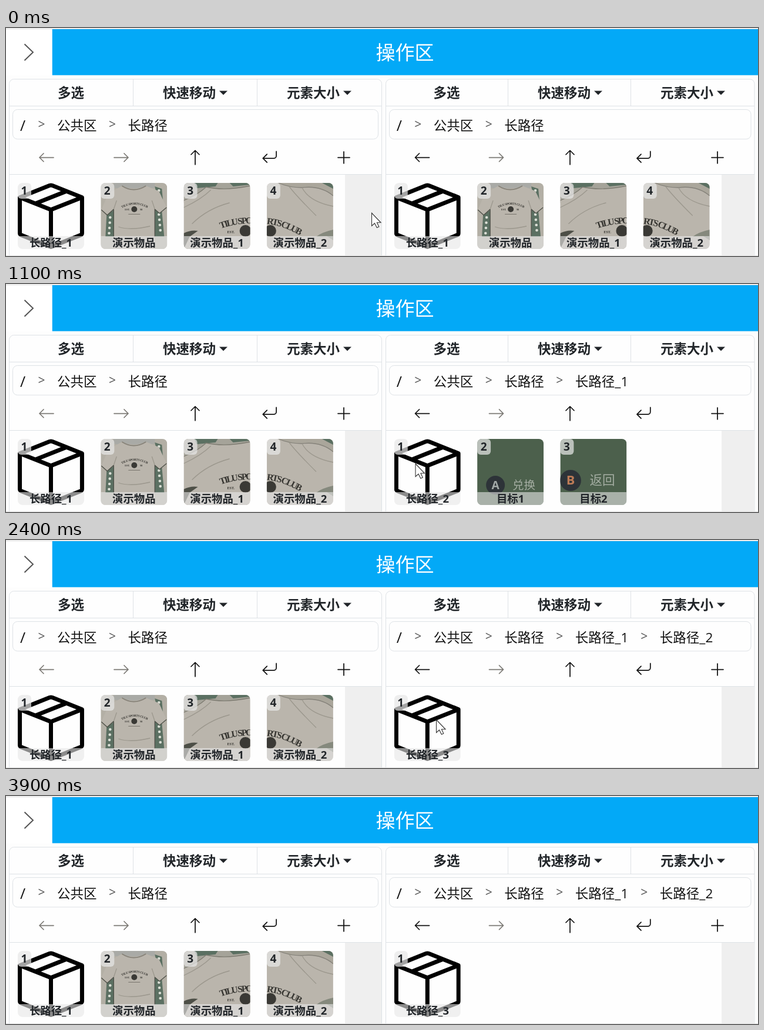
An HTML page for the animation above (4000 ms loop, 1280 px wide and 390 px high).

```html
<!DOCTYPE html>
<html lang="zh-CN">
<head>
<meta charset="utf-8">
<title>操作区</title>
<style>
html, body { margin: 0; width: 100%; height: 100%; overflow: hidden; background: #fdfdfd; }
svg { display: block; width: 1280px; height: 390px; }
text { font-family: 'Open Sans', 'Noto Sans CJK SC', 'Noto Sans CJK', sans-serif; fill: #212529; }
.title { font-size: 33px; fill: #fff; text-anchor: middle; }
.btn { font-size: 22.5px; font-weight: 700; }
.crumb { font-size: 22.5px; fill: #111; }
.root { font-size: 25px; fill: #111; }
.sep { font-size: 21px; fill: #555; }
.num { font-size: 19px; font-weight: 700; text-anchor: middle; }
.cap { font-size: 18.4px; font-weight: 700; text-anchor: middle; }
.line { fill: none; stroke: #dee2e6; }
.icon { fill: none; stroke-width: 1.75; stroke-linecap: round; stroke-linejoin: round; }
.print { font-family: 'Liberation Serif', serif; font-weight: 700; fill: #34332f; }
</style>
</head>
<body>
<svg id="stage" viewBox="0 0 1280 390" xmlns="http://www.w3.org/2000/svg"></svg>
<script>
const stage = document.getElementById('stage');
const LOOP = 4000, STEP = 100;
const INK = '#111', MUTED = '#7b7974';
const CLOTH = '#bab5ac', SHADE = '#9b978d', DARK = '#4d4f47', BOARD = '#5b7062';

const text = (cls, x, y, s, extra = '') => `<text class="${cls}" x="${x}" y="${y}" ${extra}>${s}</text>`;
const rect = (x, y, w, h, fill, rx = 0) => `<rect x="${x}" y="${y}" width="${w}" height="${h}" fill="${fill}" rx="${rx}"/>`;
const path = (d, fill) => `<path d="${d}" fill="${fill}"/>`;
const line = d => `<path class="line" d="${d}"/>`;
const dot = (x, y, r, fill) => `<circle cx="${x}" cy="${y}" r="${r}" fill="${fill}"/>`;
const fold = (d, color = SHADE, w = 1.3) => `<path d="${d}" fill="none" stroke="${color}" stroke-width="${w}"/>`;
const icon = (x, y, d, color) => `<path class="icon" transform="translate(${x} ${y})" d="${d}" stroke="${color}"/>`;
const print = (id, size, gap, s) =>
  `<text class="print" font-size="${size}" letter-spacing="${gap}"><textPath href="#${id}">${s}</textPath></text>`;

const defs = `<defs>
  <clipPath id="tile"><rect width="113" height="113" rx="8"/></clipPath>
  <path id="arch" d="M36 43Q57 31 80 43"/>
  <path id="rise" d="M63 78Q87 69 122 69"/>
  <path id="fall" d="M0 70Q32 73 66 96"/>
</defs>`;

const ICONS = {
  left: 'M12 0H-12M-5-7L-12 0L-5 7',
  right: 'M-12 0H12M5-7L12 0L5 7',
  up: 'M0 12V-12M-7-5L0-12L7-5',
  enter: 'M11.4-10.5V-3A4.4 4.4 0 0 1 7 1.4H-11.4M-4.4-5.6L-11.4 1.4L-4.4 8.4',
  plus: 'M-10 0H10M0-10V10'
};

const BOX = 'M8.186 1.113a.5.5 0 0 0-.372 0L1.846 3.5l2.404.961L10.404 2zm3.564 1.426L5.596 5 8 5.961 14.154 3.5z' +
  'm3.25 1.7-6.5 2.6v7.922l6.5-2.6V4.24zM7.5 14.762V6.838L1 4.239v7.923zM7.443.184a1.5 1.5 0 0 1 1.114 0l7.129 2.852' +
  'A.5.5 0 0 1 16 3.5v8.662a1 1 0 0 1-.629.928l-7.185 2.874a.5.5 0 0 1-.372 0L.63 13.09a1 1 0 0 1-.63-.928V3.5' +
  'a.5.5 0 0 1 .314-.464z';

const box = `<path class="box" d="${BOX}" transform="scale(7.06)"/>`;

function dots(x, y, n, dx) {
  let s = '';
  for (let i = 0; i < n; i++) s += dot(x + dx * i, y + 9 * i, 2.3, '#d9ddd4');
  return s;
}

const shirt = rect(0, 0, 113, 113, '#b3afa5') +
  path('M22 0H92V8Q56 16 22 8Z', '#a9aaa6') +
  path('M92 6L104 10L106 32L96 26Z', BOARD) + dots(99, 13, 2, 1) +
  path('M10 54L23 46V92H8Z', BOARD) + dots(16, 59, 4, -.6) +
  path('M92 42L104 48L108 92H92Z', BOARD) + dots(99, 54, 4, .8) +
  path('M36 5Q56 14 77 5L99 14L112 42L100 52L92 45V113H22V45L11 55L1 46L13 18Z', CLOTH) +
  fold('M1 46L11 55L22 45V92M112 42L100 52L92 45V92', DARK) +
  fold('M36 5Q56 18 77 5', '#88847a', 2) +
  fold('M22 45L27 30M92 45L87 30M30 75Q50 82 84 74') +
  print('arch', 5.2, -.3, 'TILU SPORTS CLUB') +
  dot(57, 45, 5, '#3a3935') +
  text('print', 41, 47, 'EST.', 'font-size="4"') + text('print', 67, 47, '98', 'font-size="4"') +
  rect(47, 53, 20, 1, '#77736b');

const left = rect(0, 0, 113, 113, CLOTH) +
  path('M0 0H113V5Q70 13 38 8Q20 22 0 34Z', '#a5a399') +
  path('M18 0H58L54 6L22 9Z', BOARD) + path('M78 0H113V3L84 6Z', BOARD) +
  path('M0 30Q24 20 38 7Q70 14 113 5V113H0Z', CLOTH) +
  fold('M0 30Q24 20 38 7Q70 14 113 5', '#7d7b71') +
  fold('M0 42Q30 28 46 12M14 70Q40 44 78 34') +
  path('M0 86Q12 80 24 82L10 92L0 113Z', DARK) +
  print('rise', 15.5, -2.3, 'TILU SPO') +
  text('print', 74, 86, 'EST.', 'font-size="6"') +
  dot(105, 82, 10, '#3a3935');

const right = rect(0, 0, 113, 113, CLOTH) +
  path('M20 0H113V22Q92 4 60 8Q38 8 20 0Z', '#aaa69b') +
  path('M94 0H113V10Z', BOARD) +
  fold('M20 0Q38 8 60 8Q92 4 113 22', '#85827a') +
  fold('M60 8Q72 32 113 40M38 6Q50 22 84 56') +
  path('M113 80Q94 84 84 92L102 91L113 98Z', '#85897d') +
  print('fall', 15.5, -2.3, 'RTS CLUB') +
  dot(6, 82, 10, '#3a3935');

const pad = (cx, cy, r, key, keyFill, x, y, size, word) => rect(0, 0, 113, 113, '#4c604c') +
  dot(cx, cy, r, '#2d3338') +
  text('', cx, cy + 7, key, `font-size="${r * 1.2}" font-weight="700" text-anchor="middle" style="fill:${keyFill}"`) +
  text('', x, y, word, `font-size="${size}" font-weight="500" style="fill:#a4ada2"`);

const swap = pad(31, 79, 16, 'A', '#a3aaa8', 60, 86, 19.5, '兑换');
const back = pad(17.5, 71, 18, 'B', '#bd7b57', 50, 78, 21.5, '返回');

const tiles = (x0, items) => items.map(([art, cap], i) =>
  `<g transform="translate(${x0 + 141.3 * i} 265)" clip-path="url(#tile)">${art}` +
  rect(0, 0, 23, 27, 'rgba(232,232,232,.7)', 6) + rect(0, 91, 113, 22, 'rgba(232,232,232,.6)') +
  text('num', 11, 20, i + 1) + text('cap', 56.5, 108.5, cap) + '</g>').join('');

const crumbs = (x0, names) => {
  let x = x0 + 63, s = text('root', x0, 175.5, '/');
  for (const n of names) {
    s += text('sep', x - 32.5, 171.5, '&gt;') + text('crumb', x, 174.5, n);
    x += n.length > 3 ? 144 : 120.5;
  }
  return s;
};

const caret = x => path(`M${x} 107.5H${x + 14}L${x + 7} 114.5Z`, '#212529');

function panel(x, w, cuts, labels, icons, backColor) {
  const r = x + w;
  return `<rect x="${x}" y="87.5" width="${w}" height="320" rx="8" fill="#fefefe" stroke="#dee2e6"/>` +
    line(`M${x} 133.5H${r}M${cuts[0]} 88V133M${cuts[1]} 88V133M${x} 250.5H${r}`) +
    `<rect class="line" x="${x + 6}" y="139.5" width="${w - 12}" height="50.5" rx="8"/>` +
    ['多选', '快速移动', '元素大小'].map((s, i) =>
      text('btn', labels[i], 119, s) + (i ? caret(labels[i] + 96) : '')).join('') +
    Object.keys(ICONS).map((k, i) =>
      icon(icons[i], 221.5, ICONS[k], i === 0 ? backColor : i === 1 ? MUTED : INK)).join('');
}

const home = [[box, '长路径_1'], [shirt, '演示物品'], [left, '演示物品_1'], [right, '演示物品_2']];
const levels = [
  { trail: ['公共区', '长路径'], items: home },
  { trail: ['公共区', '长路径', '长路径_1'], items: [[box, '长路径_2'], [swap, '目标1'], [back, '目标2']] },
  { trail: ['公共区', '长路径', '长路径_1', '长路径_2'], items: [[box, '长路径_3']] }
];

stage.innerHTML = defs +
  rect(0, 0, 1280, 390, '#fdfdfd') + rect(0, 1, 1280, 1, '#dcdcdc') +
  rect(78.5, 2, 1201.5, 78.7, '#03a9f7') + rect(0, 2, 78.5, 79, '#fff') +
  '<path d="M31.5 27.5L46 41.5L31.5 55.5" fill="none" stroke="#555" stroke-width="2"/>' +
  text('title', 679, 54, '操作区') +
  panel(5.5, 634, [216.5, 427.5], [88, 267, 478], [69, 196, 322, 448.7, 575], MUTED) +
  panel(646.5, 627.5, [854.5, 1063.5], [727.5, 905, 1114], [708.5, 834.5, 960, 1085.4, 1211], INK) +
  rect(577, 251, 62, 138, '#efefef') + rect(1218, 251, 55.5, 138, '#efefef') +
  crumbs(24, levels[0].trail) + tiles(20, home) +
  levels.map(l => `<g class="level">${crumbs(664.8, l.trail)}${tiles(660.8, l.items)}</g>`).join('') +
  rect(0, 389, 1280, 1, '#e0e0e0') +
  '<path id="cursor" d="M.5.5V22.5L5.5 18L9.3 25.6L12.8 24L9.4 16.8H16Z" fill="#fff" stroke="#333" stroke-width="1.1"/>';

const groups = [...stage.querySelectorAll('.level')];
const pressed = groups[1].querySelector('.box');
const cursor = document.getElementById('cursor');

// time, x, y
const ROUTE = [
  [0, 622, 316], [500, 692, 307], [600, 692, 307], [800, 696.5, 307], [2300, 696.5, 307],
  [2800, 874, 307], [3300, 993, 307], [3700, 1150, 400], [LOOP, 1150, 400]
];

function place(t) {
  const i = ROUTE.findIndex(k => k[0] > t);
  const [t0, x0, y0] = ROUTE[i - 1], [t1, x1, y1] = ROUTE[i];
  const p = (t - t0) / (t1 - t0);
  return [x0 + (x1 - x0) * p, y0 + (y1 - y0) * p];
}

function draw(ms) {
  const t = Math.floor(ms % LOOP / STEP) * STEP;
  const level = t < 900 ? 0 : t < 2300 ? 1 : 2;
  groups.forEach((g, i) => g.setAttribute('display', i === level ? 'inline' : 'none'));
  pressed.setAttribute('fill', t >= 2100 ? '#1b2126' : '#000');
  cursor.setAttribute('transform', `translate(${place(t)})`);
}

const start = performance.now();
function tick() {
  draw(performance.now() - start);
  requestAnimationFrame(tick);
}
draw(0);
requestAnimationFrame(tick);
</script>
</body>
</html>
```
